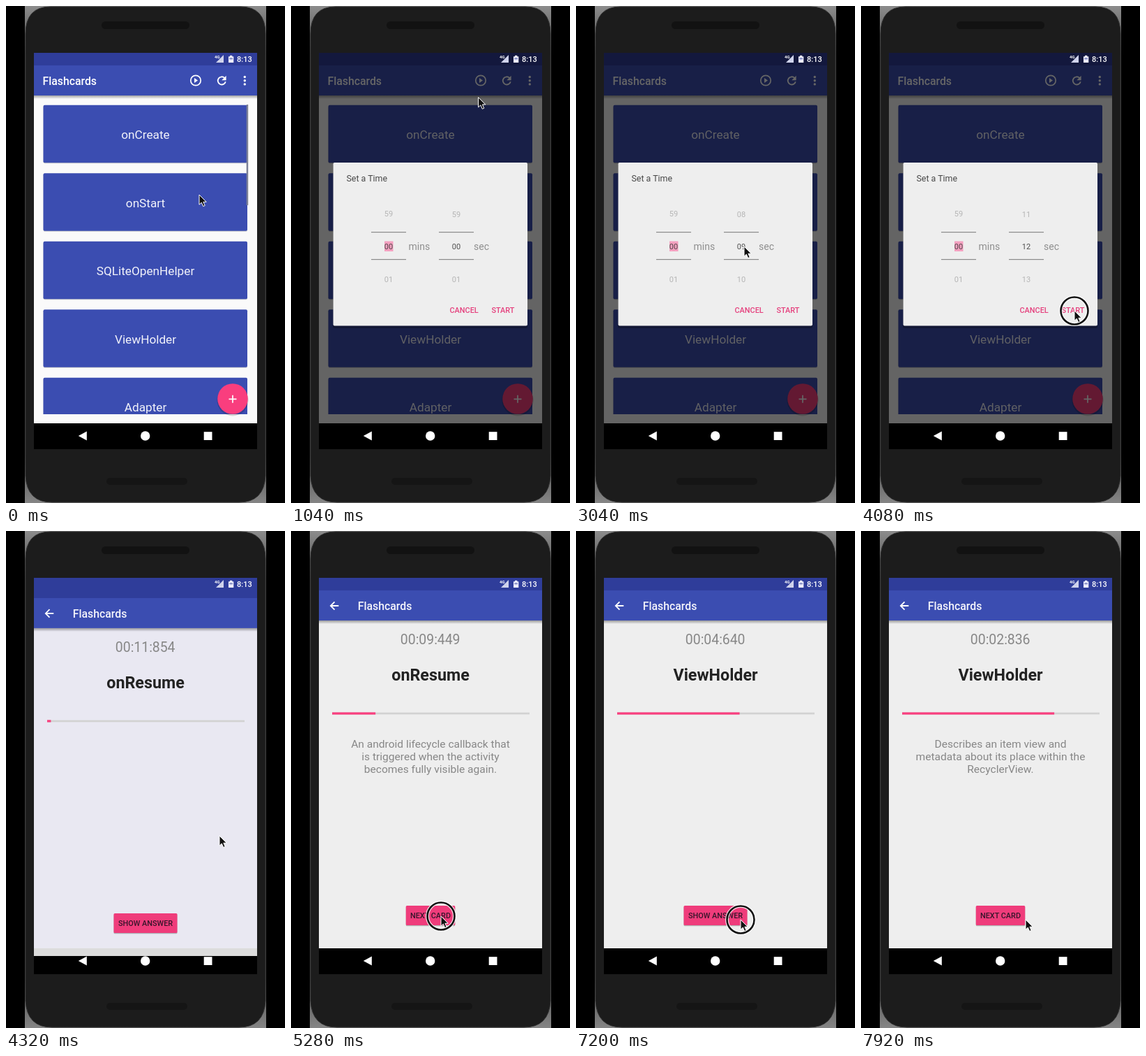
An HTML page for the animation above (8 s loop, 400x711 px).

```html
<!DOCTYPE html>
<html lang="en">
<head>
<meta charset="utf-8">
<title>Flashcards demo</title>
<style>
  html, body { margin: 0; width: 100%; height: 100%; overflow: hidden; background: #000; }
  svg { display: block; width: 100vw; height: 100vh; }
  text { font-family: Roboto, "Liberation Sans", sans-serif; }
  .mid { text-anchor: middle; }
  .medium { font-weight: 500; }
  .bold { font-weight: 700; }
</style>
</head>
<body>
<svg id="stage" viewBox="0 0 400 711" xmlns="http://www.w3.org/2000/svg"></svg>
<script>
const LOOP = 8000, STEP = 80;
const BLUE = '#3b4db1', DARK_BLUE = '#2f3d9a', PINK = '#f93e7e';

const rect = (x, y, w, h, fill, extra = '') =>
  `<rect x="${x}" y="${y}" width="${w}" height="${h}" fill="${fill}" ${extra}/>`;
const text = (x, y, size, fill, str, cls = '', extra = '') =>
  `<text x="${x}" y="${y}" font-size="${size}" fill="${fill}" class="${cls}" ${extra}>${str}</text>`;
const group = (id, body, extra = '') => `<g id="${id}" ${extra}>${body}</g>`;

const phone = () => `
  ${rect(0, 0, 400, 711, '#000')}
  ${rect(27, 0, 346, 711, 'url(#metal)')}
  <path d="M28 40Q28 1 64 1H336Q372 1 372 40V672Q370 710 334 710H66Q30 710 28 672Z"
    fill="#1c1c1c" stroke="#303030"/>
  ${rect(137, 22, 126, 11, '#121212', 'rx="5.5"')}
  ${rect(144, 675, 116, 10, '#151515', 'rx="5"')}`;

const toolbar = () =>
  rect(40, 128, 320, 5, 'url(#shade)') + rect(40, 67, 320, 18.5, DARK_BLUE) + rect(40, 85, 320, 43, BLUE);

function list() {
  const words = ['onCreate', 'onStart', 'SQLiteOpenHelper', 'ViewHolder', 'Adapter'];
  const cards = words.map((word, i) => {
    const y = 141.8 + 97.5 * i;
    return rect(53.5, y + 1, 292.5, 82.5, '#000', 'rx="2" opacity=".18"') +
      rect(53.5, y, 292.5, 82.5, BLUE, 'rx="2"') +
      text(200, y + 48.4, 17.2, '#f1f2fa', word, 'mid');
  }).join('');
  return rect(40, 128, 320, 469, '#fafafa') + toolbar() +
    text(52.5, 112.8, 15.8, '#fff', 'Flashcards', 'medium') +
    `<circle cx="272" cy="106.5" r="7.2" fill="none" stroke="#fff" stroke-width="1.7"/>
     <path d="M270 103v7l5-3.5z" fill="#fff"/>
     <path d="M313.4 103A5.6 5.6 0 1 0 314.8 108.2" fill="none" stroke="#fff" stroke-width="1.8"/>
     <path d="M315.6 99.8v6.4h-6.4z" fill="#fff"/>
     ${[101.5, 106.7, 111.9].map(y => `<circle cx="342.3" cy="${y}" r="1.7" fill="#fff"/>`).join('')}
     <g clip-path="url(#listClip)">${cards}</g>` +
    rect(344.7, 141, 2.5, 144, '#7b7f96', 'id="scrollbar"') +
    `<circle cx="325" cy="564" r="22.5" opacity=".16"/>
     <circle cx="325" cy="562" r="21.8" fill="${PINK}"/>
     <path d="M319.5 562.3h11M325 556.8v11" stroke="#fff" stroke-width="1.7"/>`;
}

function dialog() {
  const rules = [115, 212].map(x =>
    rect(x, 323, 50, 1.2, '#8a8a8a') + rect(x, 362, 50, 1.2, '#8a8a8a')).join('');
  return rect(60, 226, 279, 235, '#000', 'opacity=".25" rx="2"') +
    rect(60.5, 224, 278.5, 233.5, '#eeeeee', 'rx="2"') +
    text(79.5, 251.2, 12.4, '#484848', 'Set a Time') + rules +
    rect(134, 336.5, 12.5, 14.5, '#f3a0bf') +
    [['59', 301, .3], ['00', 348, .85], ['01', 394.5, .3]].map(([n, y, o]) =>
      text(140, y, 11, '#333', n, 'mid', `opacity="${o}"`)).join('') +
    text(168.5, 349, 14, '#8f8f8f', 'mins') + text(262, 349, 14, '#8f8f8f', 'sec') +
    group('seconds', '') +
    text(227.5, 439.3, 10.9, '#e5407d', 'CANCEL', 'medium') +
    text(287.5, 439.3, 10.9, '#e5407d', 'START', 'medium');
}

function quiz() {
  return rect(40, 128, 320, 469, '#eeeeee', 'id="paper"') +
    rect(40, 586, 320, 11, '#dcdcdc', 'id="edge"') +
    rect(40, 50, 320, 20, DARK_BLUE) + toolbar() +
    `<path d="M68.3 107H57M62.5 101.3L56.8 107l5.7 5.7" fill="none" stroke="#fff" stroke-width="1.8"/>` +
    text(95.8, 112.8, 15.8, '#f5f5fb', 'Flashcards', 'medium') +
    text(199.7, 161.7, 19.4, '#878787', '', 'mid', 'id="clock"') +
    text(200, 213.8, 23.3, '#222', '', 'mid bold', 'id="word"') +
    rect(59, 259.7, 283, 2.7, '#d2d2d2') + rect(59, 259.4, 0, 3.2, PINK, 'id="bar"') +
    group('answer', '') + group('button', '');
}

const system = () =>
  `<path d="M301 81h11V70z" fill="#cfd3ec"/>
   ${text(299, 75, 6, '#fff', '4G', 'bold')}
   <path d="M319 72.3h2v-1.5h3.3v1.5h2V81h-7.3z" fill="#eef"/>
   ${rect(320.3, 74.2, 4.6, 2.2, '#8890c5')}
   ${text(331, 79.7, 11, '#fff', '8:13', 'medium')}
   <path d="M103.8 615L115.8 608.5V621.5Z" fill="#fff"/>
   <circle cx="199.7" cy="615" r="6.7" fill="#fff"/>
   ${rect(283.7, 609.2, 11.8, 11.8, '#fff')}`;

const pointer = `
  <g id="ring" fill="none"><circle r="19.5" stroke="#fff" stroke-width="5" opacity=".85"/>
    <circle r="19.5" stroke="#111" stroke-width="2.6"/></g>
  <path d="M0 0V14.2L3.3 11.2L5.7 16.6L8.2 15.5L5.9 10.3H10.2Z" fill="#111" stroke="#fff" stroke-width="1"/>`;

const stage = document.getElementById('stage');
stage.innerHTML = `
  <defs>
    <linearGradient id="metal" x2="0" y2="1"><stop stop-color="#8c8c8c"/>
      <stop offset=".1" stop-color="#4a4a4a"/><stop offset=".9" stop-color="#4a4a4a"/>
      <stop offset="1" stop-color="#858585"/></linearGradient>
    <linearGradient id="shade" x2="0" y2="1"><stop stop-opacity=".35"/>
      <stop offset="1" stop-opacity="0"/></linearGradient>
    <clipPath id="listClip"><rect x="40" y="128" width="320" height="456"/></clipPath>
    <clipPath id="screenClip"><rect x="40" y="67" width="320" height="567"/></clipPath>
  </defs>
  ${phone()}
  <g clip-path="url(#screenClip)">
    ${rect(40, 67, 320, 567, '#000')}
    ${group('list', list())}
    ${rect(40, 67, 320, 530, '#000', 'id="dim"')}
    ${group('dialog', dialog())}
    ${group('quiz', quiz())}
    ${system()}
  </g>
  ${group('pointer', pointer)}`;

const $ = {};
stage.querySelectorAll('[id]').forEach(el => { $[el.id] = el; });

const clamp = v => Math.max(0, Math.min(1, v));
const ramp = (t, from, to) => clamp((t - from) / (to - from));
const smooth = p => p * p * (3 - 2 * p);
const set = (el, attrs) => { for (const k in attrs) el.setAttribute(k, attrs[k]); };

// Keys are [time, value, ...]; returns the eased values at t.
function track(keys, t, ease = p => p) {
  let i = 0;
  while (i < keys.length - 2 && t >= keys[i + 1][0]) i++;
  const [a, b] = [keys[i], keys[i + 1]];
  const p = ease(ramp(t, a[0], b[0]));
  return a.slice(1).map((v, k) => v + (b[k + 1] - v) * p);
}

const path = [
  [0, 277, 270], [240, 277, 270], [720, 272, 106], [960, 272, 106], [1360, 239, 343],
  [1840, 239, 343], [3040, 241, 344], [3440, 241, 344], [3840, 306, 436], [4400, 306, 436],
  [4800, 215, 551], [5440, 215, 551], [5760, 236, 556], [LOOP, 236, 556]
];
const clicks = [800, 4080, 4880, 5200, 6640, 7120, 7600];
const spin = [[1200, 60], [1840, 29.35], [2720, 9], [3120, 9], [3360, 12]];

const cards = [
  { from: 0, shown: 4960, word: 'onResume', lines: ['An android lifecycle callback that',
    'is triggered when the activity', 'becomes fully visible again.'] },
  { from: 5360, shown: 6720, word: 'SQLiteDatabase', lines: ['Exposes methods to manage',
    'a SQLite database.'] },
  { from: 7200, shown: 7680, word: 'ViewHolder', lines: ['Describes an item view and',
    'metadata about its place within the', 'RecyclerView.'] }
];

function drawSeconds(t) {
  const value = track(spin, t)[0];
  let out = '';
  for (let n = Math.floor(value) - 1; n <= Math.floor(value) + 2; n++) {
    const shift = (n - value) * 46.5;
    const far = Math.abs(shift);
    const alpha = far < 30 ? .85 - far * .006 : .67 * clamp(1 - (far - 30) / 30);
    const label = String((n + 60) % 60).padStart(2, '0');
    out += text(237, 348 + shift, 11, '#333', label, 'mid', `opacity="${alpha}"`);
  }
  $.seconds.innerHTML = out;
}

function drawQuiz(t) {
  const left = Math.max(0, Math.min(12000, Math.round(11854 - (t - 4320) * 2.505)));
  const card = cards.filter(c => t >= c.from).pop();
  const open = t >= card.shown;
  const pad = (n, len) => String(n).padStart(len, '0');
  const enter = ramp(t, 4250, 4400);
  const drop = 45 * (1 - enter) ** 2.25;
  set($.quiz, { transform: `translate(0 ${drop})`, opacity: clamp(enter * 2.2) });
  set($.paper, { fill: enter < 1 ? '#e9e8f2' : '#eeeeee' });
  set($.edge, { opacity: enter < 1 ? 1 : 0 });
  $.clock.textContent = `00:${pad(Math.floor(left / 1000), 2)}:${pad(left % 1000, 3)}`;
  $.word.textContent = card.word;
  set($.bar, { width: 283 * clamp(1.007 - left / 12000) });
  $.answer.innerHTML = open ? card.lines.map((line, i) =>
    text(200, 309.8 + 18.2 * i, 15.56, '#878787', line, 'mid')).join('') : '';
  const [label, w] = open ? ['NEXT CARD', 70.5] : ['SHOW ANSWER', 91];
  $.button.innerHTML = rect(200 - w / 2, 537.3, w, 28, '#000', 'rx="1.5" opacity=".25"') +
    rect(200 - w / 2, 536, w, 28, '#ef3c7b', 'rx="1.5"') +
    text(200, 553.8, 10.9, '#35152a', label, 'mid medium');
}

function draw(t) {
  const fade = ramp(t, 880, 1040) * (1 - ramp(t, 4160, 4320));
  set($.scrollbar, { opacity: 1 - ramp(t, 160, 480) });
  set($.dim, { opacity: .6 * fade });
  set($.dialog, { opacity: fade });
  if (fade > 0) drawSeconds(t);
  $.quiz.style.display = t > 4250 ? '' : 'none';
  if (t > 4250) drawQuiz(t);

  const [x, y] = track(path, t, smooth);
  set($.pointer, { transform: `translate(${x} ${y})` });
  $.ring.style.display = clicks.some(c => t >= c && t < c + 2 * STEP) ? '' : 'none';
}

function tick() {
  draw(Math.floor((performance.now() % LOOP) / STEP) * STEP);
  requestAnimationFrame(tick);
}
tick();
</script>
</body>
</html>
```
